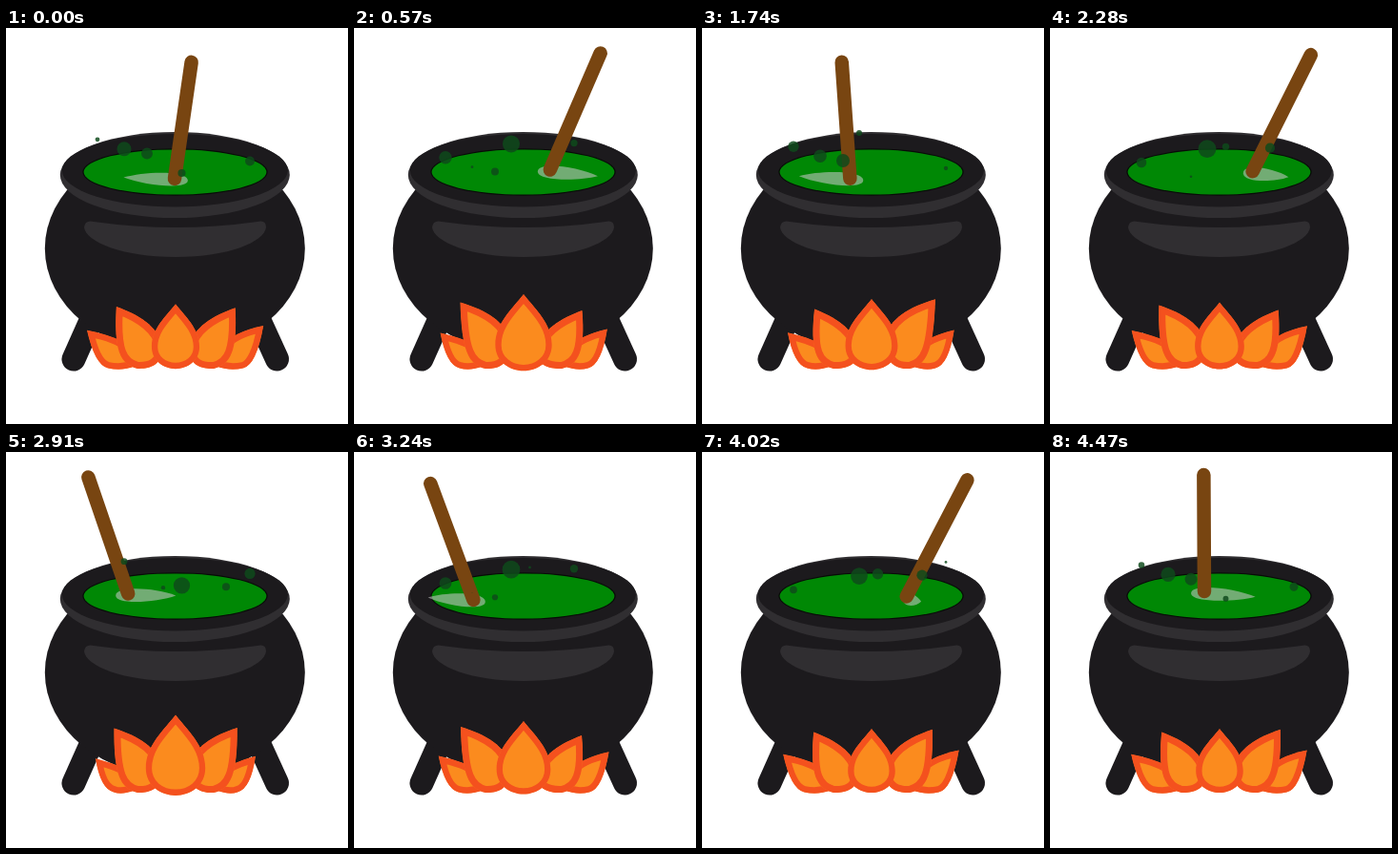
An HTML page with a canvas for the animation above (4.5 s loop, 359 by 415 pixels).

```html
<!DOCTYPE html>
<html lang="en">
<head>
<meta charset="utf-8">
<title>Cauldron</title>
<style>
html, body { margin: 0; width: 100%; height: 100%; overflow: hidden; background: #fff; }
canvas { display: block; }
</style>
</head>
<body>
<canvas id="stage" width="359" height="415"></canvas>
<script>
const ctx = document.getElementById('stage').getContext('2d');
const LOOP = 4500, STEP = 30, BUBBLE_PERIOD = 900, BUBBLE_LIFE = 680, FLAME_PERIOD = 450;
const DARK = '#1c1a1d', SHEEN = '#302e31', GREEN = '#008805';
const BROWN = '#784511', RED = '#f4511e', ORANGE = '#fb8b1e';

// x, birth time, starting y, largest radius
const bubbles = [
  [96, 295, 151.6, 7], [124, 530, 148, 7.6], [148, 440, 158, 7], [165, 160, 145, 9.5],
  [184.5, 795, 158, 8.7], [231, 40, 151, 5.7], [256, 690, 151.6, 6]
];

function ellipse(x, y, rx, ry, color) {
  ctx.fillStyle = color;
  ctx.beginPath();
  ctx.ellipse(x, y, rx, ry, 0, 0, 2 * Math.PI);
  ctx.fill();
}

function bar(x1, y1, x2, y2, width, color) {
  ctx.strokeStyle = color;
  ctx.lineWidth = width;
  ctx.lineCap = 'round';
  ctx.beginPath();
  ctx.moveTo(x1, y1);
  ctx.lineTo(x2, y2);
  ctx.stroke();
}

function drawPot() {
  bar(71, 347, 92, 300, 25, DARK);
  bar(284.5, 347, 263, 300, 25, DARK);
  ellipse(177.3, 231, 136.5, 109.3, DARK);

  ctx.fillStyle = SHEEN;
  ctx.fill(new Path2D('M82 209 Q83 201 92 203 Q178 215 264 203 Q273 201 273 209 ' +
    'C271 224 234 240 178 240 C122 240 84 224 82 209Z'));

  ellipse(177.3, 154, 120.5, 45, SHEEN);
  ellipse(177.3, 149.2, 118.5, 38.3, DARK);
  ellipse(177.5, 151, 97.2, 24.8, '#070b07');
  ellipse(177.5, 151, 95.9, 23.6, GREEN);
}

function drawStick(t) {
  const a = (12 + 0.2 * t) * Math.PI / 180;
  const s = Math.sin(a), c = Math.cos(a);
  const x = 167 + 48 * s, y = 152 + 6 * c;

  // ripple trailing behind the stick
  const turn = Math.tanh(2.8 * c);
  const tailX = -54 * turn, tailY = 2 + 3 * s - 4 * c, head = 14 * turn;
  ctx.save();
  ctx.translate(x, y);
  ctx.fillStyle = 'rgba(200,200,200,0.57)';
  ctx.beginPath();
  ctx.moveTo(tailX, tailY);
  ctx.bezierCurveTo(tailX * 0.6, tailY * 0.6 - 7, head, -9, head, 2);
  ctx.bezierCurveTo(head, 12, tailX * 0.6, tailY * 0.6 + 8, tailX, tailY);
  ctx.fill();
  ctx.restore();

  bar(172.5 + 106.5 * s, 30 + 6 * c, x, y, 14.5, BROWN);
}

function drawBubbles(t) {
  for (const [x, birth, y, size] of bubbles) {
    const age = (t - birth + 2 * BUBBLE_PERIOD) % BUBBLE_PERIOD;
    if (age >= BUBBLE_LIFE) continue;
    const r = size * Math.sin(Math.PI * age / BUBBLE_LIFE);
    ellipse(x, y - 0.0575 * age, r, r, 'rgba(14,74,28,0.84)');
  }
}

function petal(path, border) {
  ctx.save();
  ctx.clip(path);
  ctx.fillStyle = ORANGE;
  ctx.fill(path);
  ctx.strokeStyle = RED;
  ctx.lineWidth = 2 * border;
  ctx.stroke(path);
  ctx.restore();
}

function outerPetal(x, y, side, shift) {
  const p = new Path2D();
  const px = d => 178 + side * d;
  p.moveTo(x, y);
  p.quadraticCurveTo(px(58), y + 7, px(50), 334);
  p.lineTo(px(42), 354);
  p.quadraticCurveTo(px(56), 360, px(68 + shift), 356.5);
  p.quadraticCurveTo(px(82 + shift), 353, x, y);
  petal(p, 6.5);
}

function sidePetal(x, y, side) {
  const p = new Path2D();
  const px = d => 178 + side * d;
  p.moveTo(x, y);
  p.bezierCurveTo(px(40), y + 8, px(18), y + 20, px(14), y + 42);
  p.bezierCurveTo(px(13), 354, px(28), 357.5, px(40), 357);
  p.bezierCurveTo(px(58), 353, px(65), 338, x, y);
  petal(p, 7);
}

function centerPetal(tip) {
  const bottom = 357 + (290 - tip) * 0.2;
  const h = bottom - tip, w = h * 0.37, mid = tip + h * 0.66;
  const p = new Path2D();
  p.moveTo(178, tip);
  p.bezierCurveTo(178 + w * 0.4, tip + h * 0.19, 178 + w, tip + h * 0.38, 178 + w, mid);
  p.bezierCurveTo(178 + w, tip + h * 0.88, 178 + w * 0.5, bottom, 178, bottom);
  p.bezierCurveTo(178 - w * 0.5, bottom, 178 - w, tip + h * 0.88, 178 - w, mid);
  p.bezierCurveTo(178 - w, tip + h * 0.38, 178 - w * 0.4, tip + h * 0.19, 178, tip);
  petal(p, 6.3);
}

function drawFire(t) {
  const wave = peak => Math.cos(2 * Math.PI * (t - peak) / FLAME_PERIOD);
  const outerL = wave(215), outerR = wave(230), left = wave(130), right = wave(305);
  outerPetal(89.5 + 4.5 * outerL, 319 + 2.3 * outerL, -1, -3 * outerL);
  outerPetal(266 - 4.2 * outerR, 315.5 + 3.5 * outerR, 1, -3 * outerR);
  sidePetal(115 - 3.5 * left, 291.2 - 3.8 * left, -1);
  sidePetal(242 + 3 * right, 290.5 - 6.5 * right, 1);
  centerPetal(282.7 - 7.3 * wave(195));
}

function frame(now) {
  let t = Math.floor((now % LOOP) / STEP) * STEP;
  // brief hesitation in the middle of the loop
  t -= 70 * Math.exp(-(((t - 1740) / 120) ** 2));

  ctx.fillStyle = '#fff';
  ctx.fillRect(0, 0, 359, 415);
  drawPot();
  drawStick(t);
  drawBubbles(t);
  drawFire(t);
}

const start = performance.now();
function tick() {
  frame(performance.now() - start);
  requestAnimationFrame(tick);
}
tick();
</script>
</body>
</html>
```
